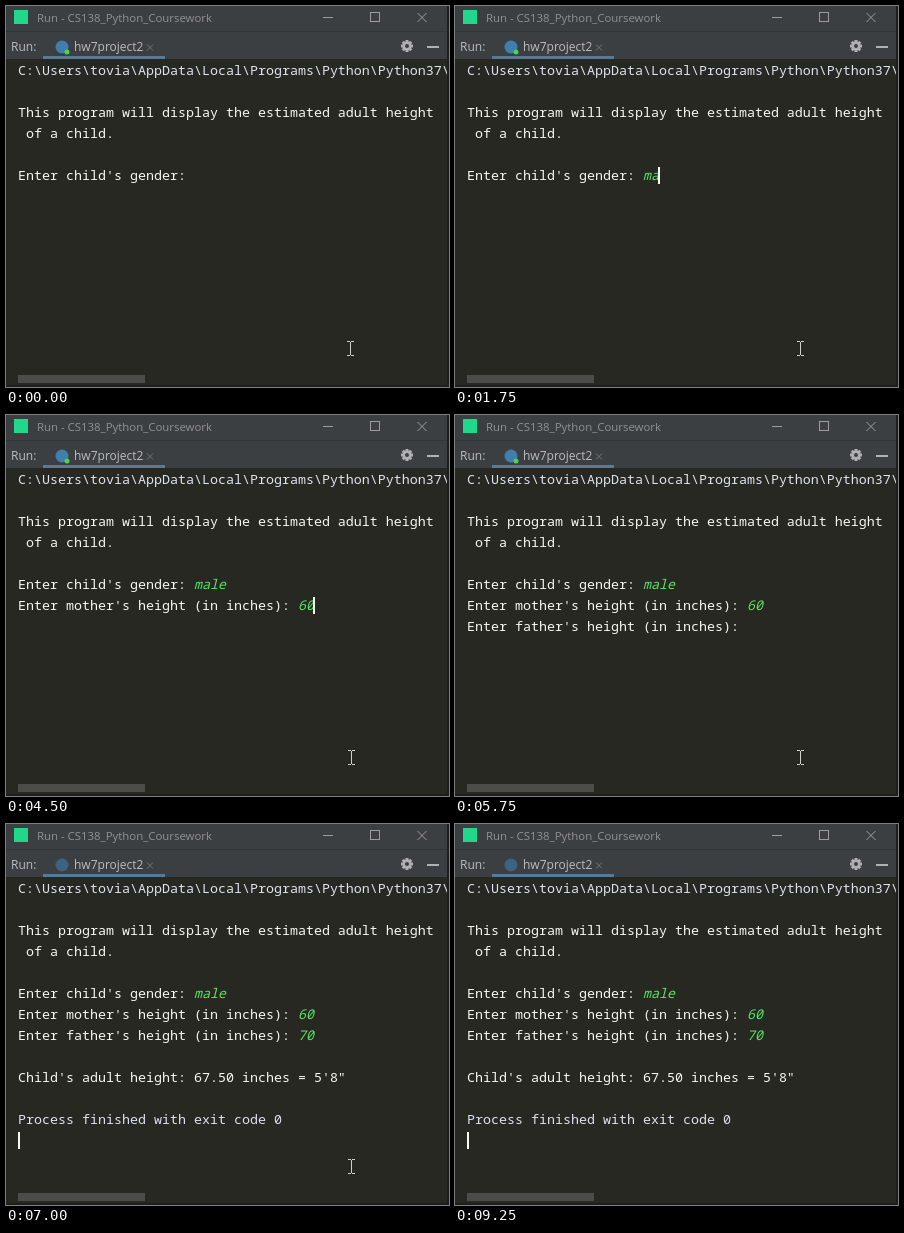
Animation of 443 by 381 pixels, one loop 9.5 s. Source, as an HTML page with a canvas:

```html
<!DOCTYPE html>
<html lang="en">
<head>
<meta charset="utf-8">
<title>Run console</title>
<style>
  html, body { margin: 0; width: 100%; height: 100%; overflow: hidden; background: #272822; }
  canvas { display: block; width: 443px; height: 381px; }
</style>
</head>
<body>
<canvas id="stage" width="443" height="381"></canvas>
<script>
const ctx = document.getElementById("stage").getContext("2d");
const LOOP = 9500;
const LEFT = 12, CHAR = 8, LINE = 21, BASELINE = 69;
const MONO = '13.333px "Noto Sans Mono", "DejaVu Sans Mono", monospace';
const UI = '"Open Sans", "Noto Sans", sans-serif';
const COLORS = { panel: "#3c3f41", console: "#272822", text: "#f8f8f2", system: "#dfe1ee", input: "#5ae364" };

const PROMPTS = [
  { row: 5, at: 0, text: "Enter child's gender: ", keys: [[1750, "ma"], [2000, "mal"], [2250, "male"]] },
  { row: 6, at: 2750, text: "Enter mother's height (in inches): ", keys: [[4500, "60"]] },
  { row: 7, at: 5000, text: "Enter father's height (in inches): ", keys: [[6000, "7"], [6250, "70"]] },
];
const ENTER_AT = 2500, FINISH_AT = 7000;
const CARET_OFF = [[0, 250], [750, 1250], [3750, 4250], [5750, 6000], [6750, 7000], [7750, 8250], [8750, 9250]];
const POINTER = [[0, [344, 342]], [250, [345, 342]], [7500, [345, 342]], [8250, [351, 324]], [8500, [316, 371]], [8750, null]];

// Value of the last step that has started.
function latest(steps, t, initial) {
  let value = initial;
  for (const [at, next] of steps) if (t >= at) value = next;
  return value;
}

function rect(x, y, w, h, color) {
  ctx.fillStyle = color;
  ctx.fillRect(x, y, w, h);
}

function label(text, x, y, font, color) {
  ctx.font = font;
  ctx.fillStyle = color;
  ctx.fillText(text, x, y);
}

function disc(x, y, r, color) {
  ctx.fillStyle = color;
  ctx.beginPath();
  ctx.arc(x, y, r, 0, 2 * Math.PI);
  ctx.fill();
}

function cross(x, y, r, color) {
  ctx.strokeStyle = color;
  ctx.lineWidth = 1;
  ctx.beginPath();
  ctx.moveTo(x - r, y - r);
  ctx.lineTo(x + r, y + r);
  ctx.moveTo(x + r, y - r);
  ctx.lineTo(x - r, y + r);
  ctx.stroke();
}

function print(row, text, color = COLORS.text, column = 0, style = "") {
  label(text, LEFT + column * CHAR, BASELINE + row * LINE, style + MONO, color);
}

function gear(x, y) {
  ctx.save();
  ctx.translate(x, y);
  for (let i = 0; i < 4; i++) {
    rect(-1.5, -6, 3, 12, "#afb1b3");
    ctx.rotate(Math.PI / 4);
  }
  ctx.restore();
  disc(x, y, 4.5, "#afb1b3");
  disc(x, y, 2, COLORS.panel);
}

function drawTitleBar() {
  rect(0, 0, 443, 53, COLORS.panel);
  rect(0, 25, 443, 1, "#323537");
  rect(8, 4, 14, 14, "#21d789");
  label("Run - CS138_Python_Coursework", 31, 16, "11.4px " + UI, "#8f9294");
  rect(317, 11, 10, 1, "#9b9d9f");
  ctx.strokeStyle = "#9b9d9f";
  ctx.lineWidth = 1;
  ctx.strokeRect(364.5, 6.5, 9, 9);
  cross(416, 11.5, 4.5, "#9b9d9f");
}

function drawTabs(running) {
  label("Run:", 5, 45, "12px " + UI, "#bbbdbf");
  disc(56, 41, 6.5, running ? "#3f7fae" : "#3c6482");
  if (running) disc(61, 46, 2.5, "#4fd34f");
  label("hw7project2", 68, 45, "12px " + UI, "#bbbdbf");
  cross(144, 41.5, 3, "#737678");
  rect(37, 50, 122, 3, "#577a99");
  gear(401, 40);
  rect(421, 40, 12, 2, "#afb1b3");
}

function drawConsole(t) {
  let row = 5, column = 0;
  print(0, "C:\\Users\\tovia\\AppData\\Local\\Programs\\Python\\Python37\\", COLORS.system);
  print(2, "This program will display the estimated adult height");
  print(3, " of a child.");
  for (const prompt of PROMPTS) {
    if (t < prompt.at) continue;
    const input = latest(prompt.keys, t, "");
    print(prompt.row, prompt.text);
    print(prompt.row, input, COLORS.input, prompt.text.length, "italic ");
    row = prompt.row;
    column = prompt.text.length + input.length;
  }
  if (t >= ENTER_AT && t < PROMPTS[1].at) {
    row = 6;
    column = 0;
  }
  if (t >= FINISH_AT) {
    print(9, "Child's adult height: 67.50 inches = 5'8\"");
    print(11, "Process finished with exit code 0", COLORS.system);
    row = 12;
    column = 0;
  }
  if (!CARET_OFF.some(([from, to]) => t >= from && t < to)) {
    rect(Math.max(LEFT, LEFT + column * CHAR - 1), BASELINE + row * LINE - 13, 2, 17, COLORS.text);
  }
  rect(12, 369, 127, 8, "#4c4d49");
}

function drawPointer([x, y]) {
  const color = "#cfcfcb";
  rect(x, y - 6, 1, 13, color);
  for (const edge of [y - 7, y + 7]) {
    rect(x - 3, edge, 3, 1, color);
    rect(x + 1, edge, 3, 1, color);
  }
}

function draw(now) {
  const t = now % LOOP;
  rect(0, 0, 443, 381, COLORS.console);
  drawTitleBar();
  drawTabs(t < FINISH_AT);
  drawConsole(t);
  const pointer = latest(POINTER, t, null);
  if (pointer) drawPointer(pointer);
  rect(441, 0, 2, 381, "#1d1e20");
  rect(0, 379, 443, 2, "#1d1e20");
}

const start = performance.now();
function tick() {
  draw(performance.now() - start);
  requestAnimationFrame(tick);
}
tick();
</script>
</body>
</html>
```
